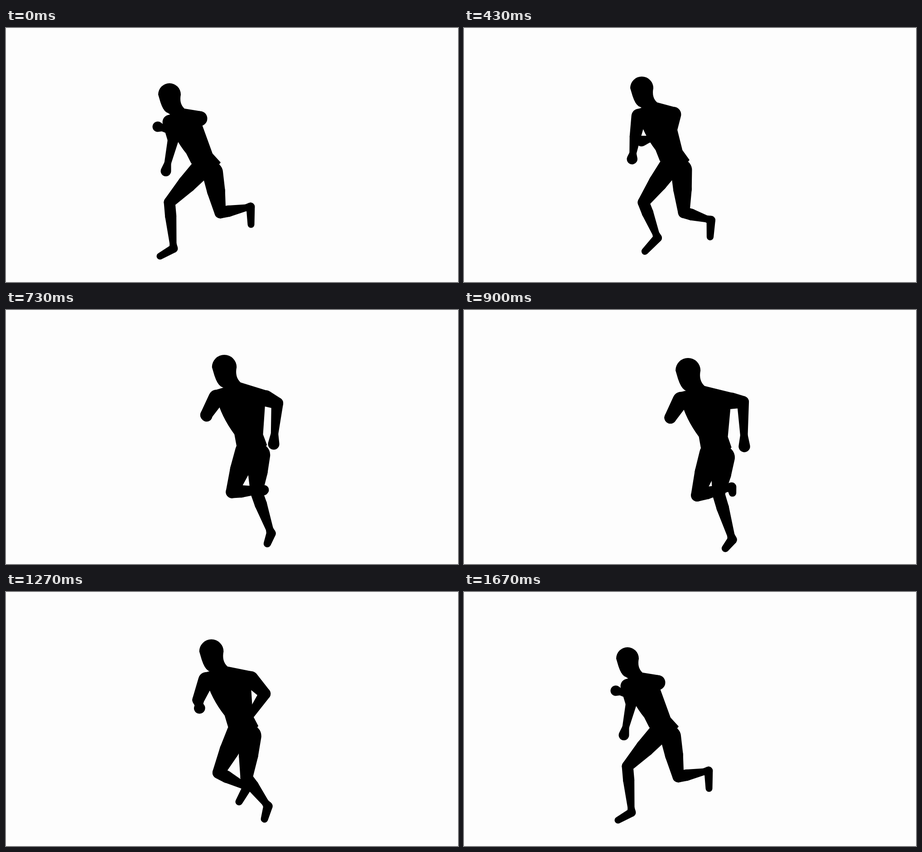
Animation, 998 px wide and 561 px high, one loop 1710 ms. Source, as an HTML page with a canvas:

```html
<!DOCTYPE html>
<html lang="en">
<head>
<meta charset="utf-8">
<title>Runner</title>
<style>
html, body { margin: 0; width: 100%; height: 100%; overflow: hidden; background: #fdfdfd; }
canvas { display: block; }
</style>
</head>
<body>
<canvas id="stage" width="998" height="561"></canvas>
<script>
const ctx = document.getElementById('stage').getContext('2d');
const LOOP = 1710, STEPS = 50, STEP_MS = 100 / 3;
const EASE = 0.65; // how far a joint swings past its key points

// Key points of the stride; the first is met on the way out and on the way back
const KEYS = [0, 8, 17, 22, 32, 43];
const POSE = [0, 0, 1, 2, 3, 4];
const joints = {
  crown:     [[361, 122], [425, 97], [482, 99], [490, 112], [417, 101]],
  shoulderL: [[362, 208], [413, 187], [465, 194], [477, 202], [408, 191]],
  shoulderR: [[428, 200], [500, 186], [573, 195], [585, 203], [495, 186]],
  elbowL:    [[369, 247], [393, 235], [442, 232], [455, 244], [396, 235]],
  handL:     [[353, 316], [393, 265], [443, 234], [456, 245], [398, 271]],
  elbowR:    [[375, 228], [527, 232], [599, 206], [611, 208], [519, 236]],
  handR:     [[335, 218], [456, 276], [591, 296], [607, 301], [447, 277]],
  pelvis:    [[431, 311], [480, 303], [531, 312], [544, 320], [480, 303]],
  kneeL:     [[361, 385], [433, 388], [499, 402], [511, 412], [427, 388]],
  ankleL:    [[369, 477], [477, 432], [560, 398], [577, 400], [467, 451]],
  toeL:      [[340, 504], [461, 473], [570, 401], [583, 428], [446, 490]],
  kneeR:     [[473, 408], [503, 406], [553, 402], [557, 412], [506, 408]],
  ankleR:    [[530, 397], [546, 446], [582, 484], [587, 499], [557, 433]],
  toeR:      [[541, 434], [550, 486], [577, 516], [571, 527], [567, 475]]
};

// Periodic cubic through the key points of one joint
function jointAt(points, step) {
  const n = KEYS.length;
  const time = i => KEYS[(i + n) % n] + STEPS * Math.floor(i / n);
  let i = n - 1;
  while (KEYS[i] > step) i--;
  const [ha, h, hb] = [0, 1, 2].map(d => time(i + d) - time(i + d - 1));
  const u = (step - time(i)) / h;
  const [a, b, c, d] = [-1, 0, 1, 2].map(k => points[POSE[(i + k + n) % n]]);
  return b.map((p, j) => {
    const q = c[j], before = (p - a[j]) / ha, slope = (q - p) / h, after = (d[j] - q) / hb;
    const m0 = EASE * h * (before * h + slope * ha) / (ha + h);
    const m1 = EASE * h * (slope * hb + after * h) / (h + hb);
    return p + u * (m0 + u * (3 * (q - p) - 2 * m0 - m1 + u * (2 * (p - q) + m0 + m1)));
  });
}

const mix = (p, q, t) => p.map((v, i) => v + (q[i] - v) * t);
const move = ([x, y], dx, dy) => [x + dx, y + dy];

// Rounded limb through [point, radius] nodes
function limb(scale, ...nodes) {
  for (let i = 1; i < nodes.length; i++) {
    const [[p, r0], [q, r1]] = [nodes[i - 1], nodes[i]];
    const dx = q[0] - p[0], dy = q[1] - p[1], length = Math.hypot(dx, dy) || 1;
    const turn = Math.atan2(dy, dx);
    const lean = Math.acos(Math.max(-1, Math.min(1, (r0 - r1) * scale / length)));
    ctx.beginPath();
    ctx.arc(...p, r0 * scale, turn + lean, turn - lean + 2 * Math.PI);
    ctx.arc(...q, r1 * scale, turn - lean, turn + lean);
    ctx.fill();
  }
}

function arm(scale, shoulder, elbow, hand) {
  limb(scale, [shoulder, 16.5], [elbow, 12], [mix(elbow, hand, 0.75), 7.5], [hand, 11.5]);
}

function leg(scale, hip, knee, ankle, toe) {
  const shin = Math.hypot(ankle[0] - knee[0], ankle[1] - knee[1]);
  const heel = mix(knee, ankle, 1 + 10 / shin);
  limb(scale, [hip, 23], [mix(hip, knee, 0.45), 20], [knee, 12.5],
    [mix(knee, ankle, 0.33), 12.5], [ankle, 7.5], [heel, 9.5], [toe, 7.5]);
}

function head(scale, crown) {
  ctx.save();
  ctx.translate(...crown);
  ctx.scale(scale, scale);
  ctx.beginPath();
  ctx.ellipse(0, 25, 25, 25, 0, Math.PI, 2 * Math.PI);
  ctx.quadraticCurveTo(21, 45, 33, 56);
  ctx.lineTo(15, 78);
  ctx.lineTo(-3, 66);
  ctx.quadraticCurveTo(-11, 64, -17, 50);
  ctx.lineTo(-20, 42);
  ctx.fill();
  ctx.restore();
}

function torso(scale, crown, left, right, hipL, hipR) {
  const waist = mix(mix(left, right, 0.5), mix(hipL, hipR, 0.5), 0.66);
  const waistL = move(waist, -29 * scale, 0);
  const outline = [move(left, -2, -16 * scale), move(crown, 33 * scale, 56 * scale),
    move(right, 0, -16.5 * scale), right, move(waist, 29 * scale, 0),
    move(hipR, 18, -22), hipR, hipL, move(hipL, -22, -12), waistL];
  ctx.beginPath();
  for (const point of outline) ctx.lineTo(...point);
  ctx.quadraticCurveTo(...move(mix(waistL, left, 0.5), -10, 0), ...left);
  ctx.fill();
}

function draw(ms) {
  const step = Math.min(STEPS, Math.floor((ms % LOOP + 5) / STEP_MS)) % STEPS;
  const at = {};
  for (const name in joints) at[name] = jointAt(joints[name], step);
  const scale = 1 + (at.pelvis[0] - 431) * 0.0009; // grows towards the viewer
  const hipR = move(at.pelvis, 25 * scale, 8);

  ctx.fillStyle = '#fdfdfd';
  ctx.fillRect(0, 0, 998, 561);
  ctx.fillStyle = '#000';
  head(scale, at.crown);
  torso(scale, at.crown, at.shoulderL, at.shoulderR, at.pelvis, hipR);
  arm(scale, at.shoulderL, at.elbowL, at.handL);
  arm(scale, at.shoulderR, at.elbowR, at.handR);
  leg(scale, at.pelvis, at.kneeL, at.ankleL, at.toeL);
  leg(scale, hipR, at.kneeR, at.ankleR, at.toeR);
}

let start;
function frame(now) {
  start ??= now;
  draw(now - start);
  requestAnimationFrame(frame);
}
draw(0);
requestAnimationFrame(frame);
</script>
</body>
</html>
```
